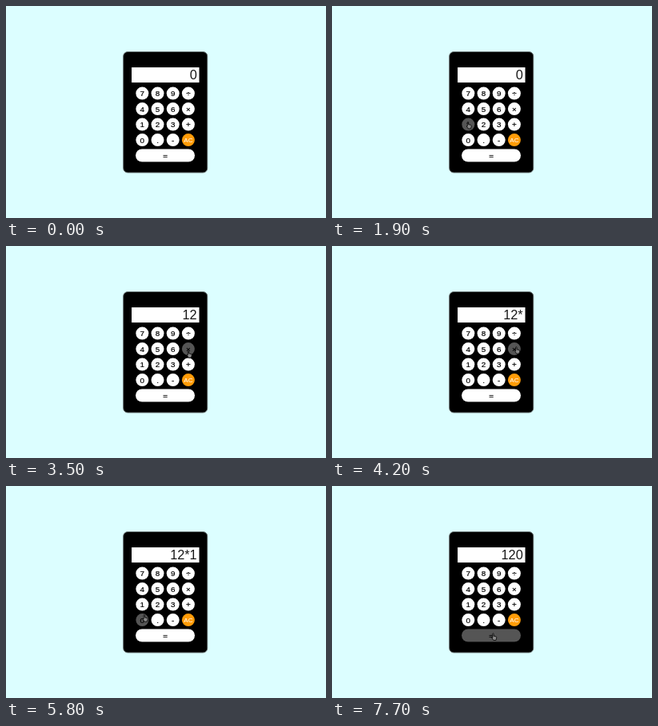
Animation of 400x266 px, one loop 8000 ms. Source, as an HTML page:

```html
<!DOCTYPE html>
<html lang="en">
<head>
<meta charset="utf-8">
<title>Calculator</title>
<style>
  html, body { margin: 0; width: 100%; height: 100%; overflow: hidden; background: #dcfeff; }
  svg { display: block; width: 400px; height: 266px; }
  text { font-family: "Liberation Sans", Arial, sans-serif; }
  .key rect { fill: #fff; }
  .key text { font-size: 9.8px; text-anchor: middle; fill: #000; stroke: #000; stroke-width: .2px; }
  .key.clear rect { fill: #ff9c08; }
  .key.clear text { font-size: 8px; fill: #fff; stroke: none; }
  .key.hover rect { fill: #555; }
  #display { font-size: 16.3px; text-anchor: end; fill: #181818; }
</style>
</head>
<body>
<svg viewBox="0 0 400 266">
  <rect x="146.7" y="57.5" width="105" height="151.5" rx="5.5" fill="#000" stroke="#5c6464"/>
  <rect x="157" y="77" width="84.5" height="19" fill="#fff"/>
  <text id="display" x="238.7" y="91.9">0</text>
  <g id="keys"></g>
  <g id="cursor">
    <path id="arrow" d="M0 0V8.6L1.9 6.9L3.2 10L4.6 9.4L3.3 6.4H5.9Z" fill="#000" stroke="#fff" stroke-width=".5"/>
    <path id="hand" d="M1 .8Q1.7 0 2.3 .8V3.7L5.2 4.4Q6.2 4.8 5.9 6.2L5.2 9H2L0 6.1Q-.1 5.2 1 5.7Z" fill="#888" stroke="#000" stroke-width=".8"/>
  </g>
</svg>
<script>
const LOOP = 8000, STEP = 100, RADIUS = 8;
const $ = id => document.getElementById(id);
const display = $("display"), cursor = $("cursor"), arrow = $("arrow"), hand = $("hand");

function svg(tag, attrs, parent) {
  const el = document.createElementNS("http://www.w3.org/2000/svg", tag);
  for (const k in attrs) el.setAttribute(k, attrs[k]);
  return parent.appendChild(el);
}

const keys = {};
function addKey(label, x, y, halfWidth = RADIUS) {
  const clear = label === "AC";
  const el = svg("g", { class: clear ? "key clear" : "key" }, $("keys"));
  svg("rect", { x: x - halfWidth, y: y - RADIUS, width: halfWidth * 2, height: RADIUS * 2, rx: RADIUS }, el);
  svg("text", { x, y: y + (clear ? 2.9 : 3.4) }, el).textContent = label;
  keys[label] = { el, x, y, flat: halfWidth - RADIUS, reacts: !clear };
}
[..."789÷456×123+0.-", "AC"].forEach((label, i) =>
  addKey(label, 170.3 + (i % 4) * 19.2, 109.6 + Math.floor(i / 4) * 19.5));
addKey("=", 199, 187.5, 37);

// Each visit: leave, arrive and press times; bend bows the way downwards.
const visits = [
  { leave: 1300, arrive: 2300, press: 2500, key: "1" },
  { leave: 2600, arrive: 2900, press: 3100, key: "2" },
  { leave: 3200, arrive: 3800, press: 4200, key: "×", bend: 20 },
  { leave: 4300, arrive: 5200, press: 5400, key: "1" },
  { leave: 5700, arrive: 6000, press: 6200, key: "0" },
  { leave: 6700, arrive: 7500, press: 7700, key: "=" }
];
const entry = { leave: 500, arrive: 1000, x: 62, y: 118 };
const moves = [entry, ...visits.map(v => ({ ...v, x: keys[v.key].x + .8, y: keys[v.key].y - 3 }))];

const easeOut = k => 1 - (1 - k) ** 4;

function pointAt(t) {
  let x = -80, y = 118;
  for (const m of moves) {
    if (t <= m.leave) break;
    const k = easeOut(Math.min(1, (t - m.leave) / (m.arrive - m.leave)));
    x += (m.x - x) * k;
    y += (m.y - y) * k + (m.bend || 0) * Math.sin(Math.PI * k);
  }
  return [x, y];
}

function readout(t) {
  let text = "";
  for (const { press, key } of visits) {
    if (t < press) break;
    text = key === "=" ? String(text.split("*").reduce((a, b) => a * b)) : text + key.replace("×", "*");
  }
  return text || "0";
}

function contains(key, x, y) {
  const dx = Math.max(0, Math.abs(x - key.x) - key.flat);
  return Math.hypot(dx, y - key.y) <= RADIUS;
}

function draw(time) {
  const t = Math.floor((time % LOOP) / STEP) * STEP;
  const [x, y] = pointAt(t);
  let over = false;
  for (const key of Object.values(keys)) {
    const hit = key.reacts && contains(key, x, y);
    key.el.classList.toggle("hover", hit);
    over = over || hit;
  }
  cursor.setAttribute("transform", `translate(${x} ${y})`);
  arrow.style.display = over ? "none" : "";
  hand.style.display = over ? "" : "none";
  display.textContent = readout(t);
}

const start = performance.now();
function tick() {
  draw(performance.now() - start);
  requestAnimationFrame(tick);
}
tick();
</script>
</body>
</html>
```
